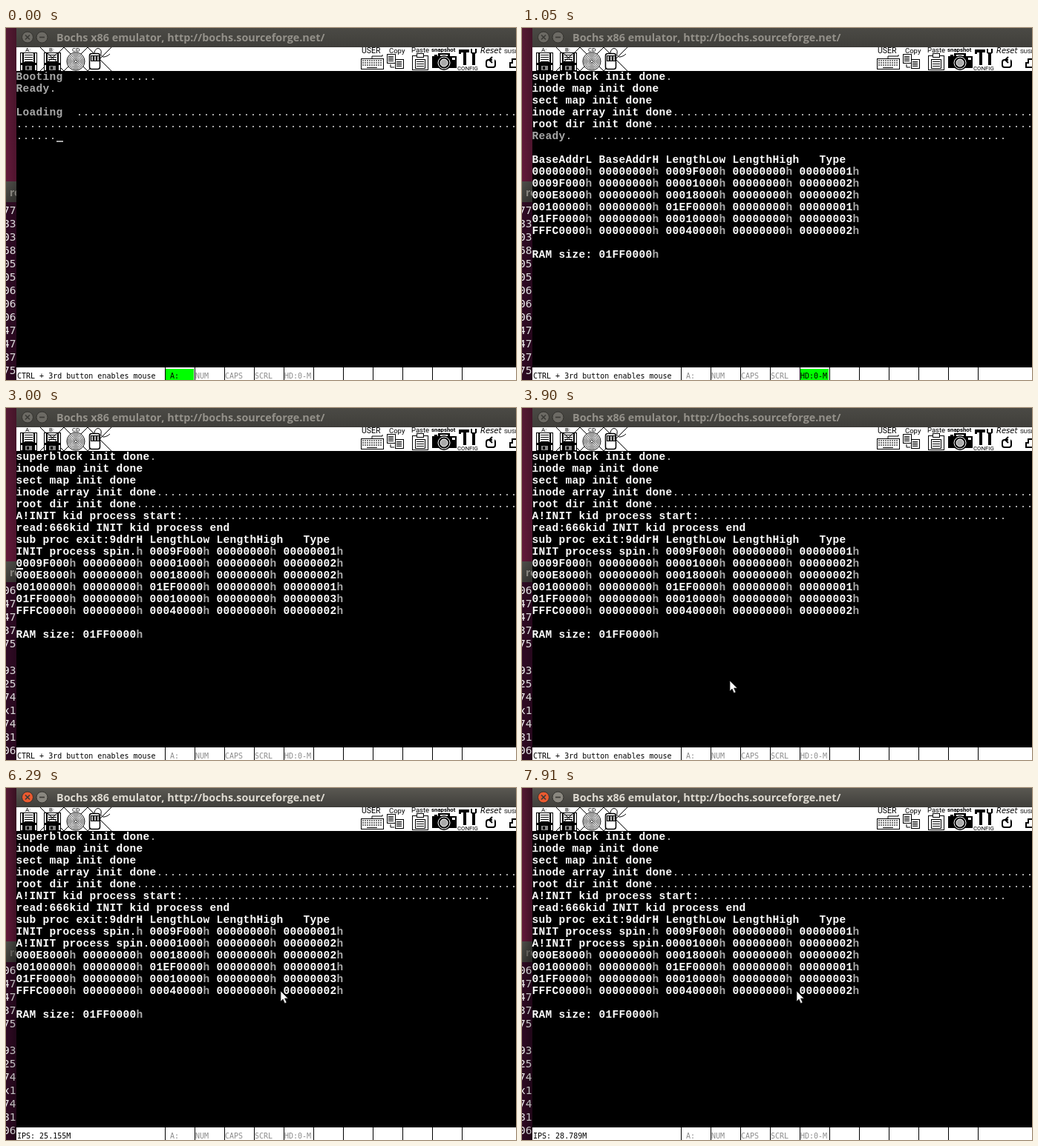
Animation of 687 by 475 pixels, one loop 8 s. Source, as an HTML page with a canvas:

```html
<!DOCTYPE html>
<html lang="en">
<head>
<meta charset="utf-8">
<title>Emulator boot</title>
<style>
html, body { margin: 0; width: 100%; height: 100%; overflow: hidden; background: #000; }
canvas { display: block; }
</style>
</head>
<body>
<canvas id="stage" width="687" height="475"></canvas>
<script>
const g = document.getElementById('stage').getContext('2d');
const LOOP = 8000, STEP = 150, LEFT = 14, TOP = 58, CELL_W = 9, CELL_H = 16;
const WHITE = '#fff', GRAY = '#a8a8a8', GREEN = '#0f0', ORANGE = '#ff4500';
const VGA = 'bold 14.5px "Liberation Mono", monospace';
const SMALL = '10px "DejaVu Sans Mono", monospace';
const ICON = 'Roboto, sans-serif';

const dots = n => '.'.repeat(n);
const table = [
  'BaseAddrL BaseAddrH LengthLow LengthHigh   Type',
  ...['00000000 0009F000 00000001', '0009F000 00001000 00000002', '000E8000 00018000 00000002',
    '00100000 01EF0000 00000001', '01FF0000 00010000 00000003', 'FFFC0000 00040000 00000002'
  ].map(line => {
    const [base, length, type] = line.split(' ');
    return [base, '00000000', length, '00000000', type].map(v => v + 'h').join(' ');
  }),
  '', 'RAM size: 01FF0000h'
];

// Console output: [time, row, text, colour]
const prints = [
  [0, 0, 'Booting  ' + dots(12), GRAY],
  [0, 1, 'Ready.', GRAY],
  [0, 3, 'Loading  ' + dots(71), GRAY],
  [0, 4, dots(80), GRAY],
  [0, 5, dots(6), GRAY],
  [150, 5, dots(40), GRAY],
  [300, 5, 'Ready.   ' + dots(62), GRAY],
  ...table.map((text, i) => [300, 7 + i, text, WHITE]),
  [300, 0, 'superblock init done', WHITE],
  [300, 1, 'inode map init done', WHITE],
  [450, 2, 'sect map init done', WHITE],
  [750, 3, 'inode array init done', WHITE],
  [1050, 4, 'root dir init done', WHITE],
  [1200, 5, 'A!INIT kid process start:', WHITE],
  [1200, 6, 'read:666kid INIT kid process end', WHITE],
  [2250, 7, 'sub proc exit:9', WHITE],
  [2400, 8, 'INIT process spin.', WHITE],
  [6150, 9, 'A!INIT process spin.', WHITE]
];
const log = '77 83 03 68 05 05 06 06 06 47 47 37 75  93 25 74 x1 74 81 06'.split(' ');
const pointerPath = [[3300, 440, 468], [3900, 280, 368], [4950, 280, 368], [5550, 370, 274]];

function rect(x, y, w, h, color) {
  g.fillStyle = color;
  g.fillRect(x, y, w, h);
}
function box(x, y, w, h, fill = WHITE) {
  rect(x, y, w, h, '#000');
  rect(x + 1, y + 1, w - 2, h - 2, fill);
}
function text(str, x, y, font, color = '#000') {
  g.font = font;
  g.fillStyle = color;
  g.fillText(str, x, y);
}
function line(points, color = '#000', width = 1) {
  g.strokeStyle = color;
  g.lineWidth = width;
  g.beginPath();
  points.forEach(([x, y]) => g.lineTo(x, y));
  g.stroke();
}
function circle(x, y, r, fill, stroke) {
  g.beginPath();
  g.arc(x, y, r, 0, 7);
  if (fill) { g.fillStyle = fill; g.fill(); }
  if (stroke) { g.strokeStyle = stroke; g.lineWidth = 1; g.stroke(); }
}
function gradient(x0, y0, x1, y1, from, to) {
  const fill = g.createLinearGradient(x0, y0, x1, y1);
  fill.addColorStop(0, from);
  fill.addColorStop(1, to);
  return fill;
}

function drawBackdrop(t, focused) {
  rect(0, 0, 14, 207, gradient(0, 0, 0, 207, '#551a33', '#64193a'));
  rect(0, 207, 14, 28, gradient(0, 207, 0, 235, '#504f4a', '#3c3b37'));
  text('ro', 5, 227, 'bold 14px "Open Sans", sans-serif', focused ? '#77746e' : '#98958e');
  rect(0, 235, 14, 240, '#300a24');
  const scroll = t < 1200 ? 0 : t < 2100 ? 7 : 8;
  log.slice(scroll, scroll + 13).forEach((s, i) =>
    text(s, -4, 251 + i * 18, '14.5px "DejaVu Sans Mono", monospace', WHITE));
  rect(0, 0, 14, 475, gradient(0, 0, 14, 0, 'rgba(0,0,0,0)', `rgba(0,0,0,${focused ? .35 : .2})`));
}

function drawTitle(focused) {
  rect(14, 0, 673, 26, gradient(0, 0, 0, 26, focused ? '#5a5852' : '#4b4a45', '#3f3e3a'));
  const mark = '#3c3b37', idle = focused ? '#8a877f' : '#6c6a64';
  circle(29, 12.5, 7.5, focused ? '#ea5a30' : idle, '#32312d');
  line([[26, 9.5], [32, 15.5]], mark, 1.7);
  line([[32, 9.5], [26, 15.5]], mark, 1.7);
  circle(48.5, 12.5, 7.5, idle, '#32312d');
  line([[45, 12.5], [52, 12.5]], mark, 1.7);
  text('Bochs x86 emulator, http://bochs.sourceforge.net/', 68, 18,
    'bold 14.36px "Open Sans", sans-serif', focused ? '#dfdbd2' : '#94918a');
}

function drawFloppy(x, label) {
  text(label, x + 7, 32, '8px ' + ICON);
  box(x, 33, 23, 25);
  rect(x + 3, 33, 17, 25, '#000');
  rect(x + 5, 34, 13, 12, WHITE);
  for (let y = 36; y < 46; y += 3) rect(x + 6, y, 11, 1, '#000');
  rect(x + 1, 47, 21, 3, '#000');
  rect(x + 7, 51, 9, 6, '#888');
  rect(x + 9, 52, 3, 4, '#000');
}

function drawToolbar() {
  rect(14, 26, 673, 32, WHITE);
  for (const x of [46, 78, 110]) {
    line([[x, 26], [x + 32, 58]]);
    line([[x + 32, 26], [x, 58]]);
  }
  drawFloppy(19, 'A:');
  drawFloppy(51, 'B:');
  line([[56, 34], [69, 46]]);
  line([[69, 34], [56, 46]]);

  rect(88, 26, 14, 7, WHITE);
  text('CD', 89, 32, '8px ' + ICON);
  circle(94, 45, 12, WHITE, '#000');
  for (const r of [10, 8, 6, 4]) circle(94, 45, r, null, '#444');
  circle(94, 45, 2, WHITE, '#000');

  g.beginPath();
  g.roundRect(112.5, 34.5, 14, 21, 3);
  g.fillStyle = WHITE;
  g.fill();
  g.strokeStyle = '#000';
  g.lineWidth = 1.5;
  g.stroke();
  for (const x of [114, 118, 122]) box(x, 37, 4, 8, '#bbb');
  g.beginPath();
  g.moveTo(119, 34);
  g.bezierCurveTo(120, 24, 130, 27, 128, 34);
  g.bezierCurveTo(127, 42, 136, 39, 140, 35);
  g.lineWidth = 1;
  g.stroke();

  text('USER', 479, 34, '10.5px ' + ICON);
  line([[493, 41], [493, 38], [507, 38], [507, 36]]);
  box(478, 41, 31, 15);
  for (let y = 43; y < 52; y += 3)
    for (let x = 480; x < 506; x += 3) rect(x, y, 2, 2, '#777');
  rect(486, 53, 14, 1, '#000');

  text('Copy', 516, 34, '9.5px ' + ICON);
  for (const [x, y] of [[513, 35], [524, 42]]) {
    box(x, y, 12, 13);
    for (let i = 3; i < 11; i += 2) rect(x + 2, y + i, 7, 1, '#000');
  }
  line([[518, 49], [518, 53], [523, 53]]);

  text('Paste', 546, 33, '9.5px ' + ICON);
  box(547, 37, 22, 20);
  box(553, 34, 10, 6);
  box(551, 42, 14, 13);
  for (let y = 45; y < 54; y += 3) rect(553, y, 10, 1, '#000');

  text('snapshot', 573, 32, 'bold 7.8px ' + ICON);
  rect(574, 38, 33, 16, '#000');
  rect(582, 34, 16, 5, '#000');
  rect(577, 36, 4, 2, '#000');
  rect(585, 36, 10, 2, WHITE);
  circle(590, 47, 10, '#000');
  circle(590, 47, 8, null, WHITE);
  circle(590, 47, 5, '#aaa', WHITE);
  rect(601, 40, 4, 3, WHITE);

  rect(610, 29, 14, 4, '#000');
  rect(610, 33, 3, 2, '#000');
  rect(616, 32, 4, 18, '#000');
  rect(628, 33, 4, 17, '#000');
  line([[627, 28], [627, 33], [630, 35], [633, 33], [633, 28]], '#000', 2);
  text('CONFIG', 608, 57, '7.8px ' + ICON);

  text('Reset', 639, 34, 'italic 10px "DejaVu Sans", sans-serif');
  g.beginPath();
  g.roundRect(647, 43, 12, 10, 3);
  g.lineWidth = 2;
  g.stroke();
  rect(655, 41, 3, 4, WHITE);
  line([[655, 39], [651, 43], [655, 47]], '#000', 2);
  text('SUSPEND', 671, 34, '8px ' + ICON);
  line([[688, 42], [682, 42], [682, 47], [679, 47], [679, 53], [688, 53]], '#000', 2);
}

function drawConsole(t) {
  rect(14, 58, 673, 400, '#000');
  const cells = {};
  for (const [time, row, str, color] of prints) {
    if (time > t) continue;
    [...str].forEach((ch, col) => {
      const suffix = ch === 'h' && /[0-9A-F]/.test(str[col - 1] || '');
      cells[row * 80 + col] = [ch, suffix ? GRAY : color];
    });
  }
  for (const key in cells) {
    const [ch, color] = cells[key];
    const x = LEFT + key % 80 * CELL_W, y = TOP + Math.floor(key / 80) * CELL_H;
    if (ch === '.') rect(x + 3, y + 10, 2, 2, color);
    else if (ch !== ' ') text(ch, x - .6, y + 12, VGA, color);
  }
}

function cursorCell(t, now) {
  if (t < 150) return [5, 6];
  if (t < 300) return [5, 40];
  if (t === 450) return [2, 18];
  if (t === 750) return [3, 21];
  if (t >= 3000 && t < 3300) return [9, 0];
  if (t >= 3300 && t < 5400) return (t - 3300) / STEP % 2 ? [9, 0] : null;
  if (now >= 6440) return now < 6730 || Math.floor((now - 6730) / 147) % 2 ? [10, 0] : null;
  return null;
}

function drawStatus(t, now) {
  rect(14, 458, 673, 17, WHITE);
  const speed = t < 6000 ? '33.835' : now < 7473 ? '25.155' : '28.789';
  text(t < 5400 ? 'CTRL + 3rd button enables mouse' : `IPS: ${speed}M`, 15, 473, SMALL);
  const disk = t < 300 || t >= 2550 ? null : t < 1050 ? ORANGE : GREEN;
  const lamps = [[' A:', t < 300 ? GREEN : null], ['NUM'], ['CAPS'], ['SCRL'], ['HD:0-M', disk]];
  lamps.forEach(([label, color], i) => {
    const x = 215 + i * 40;
    if (color) rect(x, 460, 38, 15, color);
    text(label, x, 473, SMALL, color ? '#000' : '#8c8c8c');
  });
  for (let x = 214; x < 654; x += 40) rect(x, 458, 1, 17, '#000');
}

function drawPointer(t) {
  if (t < pointerPath[0][0]) return;
  let [, x, y] = pointerPath[pointerPath.length - 1];
  const next = pointerPath.findIndex(p => p[0] > t);
  if (next > 0) {
    const [t0, x0, y0] = pointerPath[next - 1], [t1, x1, y1] = pointerPath[next];
    const k = (t - t0) / (t1 - t0);
    x = x0 + (x1 - x0) * k;
    y = y0 + (y1 - y0) * k;
  }
  g.beginPath();
  for (const [dx, dy] of [[0, 0], [0, 14], [3, 11], [5.5, 16.5], [8, 15.5], [5.5, 10], [10, 10]])
    g.lineTo(x + dx, y + dy);
  g.closePath();
  g.fillStyle = WHITE;
  g.fill();
  g.strokeStyle = '#222';
  g.lineWidth = .7;
  g.stroke();
}

function frame() {
  const now = performance.now() % LOOP;
  const t = Math.floor(now / STEP) * STEP;
  const focused = t >= 5700;
  drawBackdrop(t, focused);
  drawTitle(focused);
  drawToolbar();
  drawConsole(t);
  const cursor = cursorCell(t, now);
  if (cursor) rect(LEFT + cursor[1] * CELL_W, TOP + cursor[0] * CELL_H + 14, CELL_W, 2, cursor[0] === 5 ? GRAY : WHITE);
  drawStatus(t, now);
  drawPointer(t);
  requestAnimationFrame(frame);
}
frame();
</script>
</body>
</html>
```
